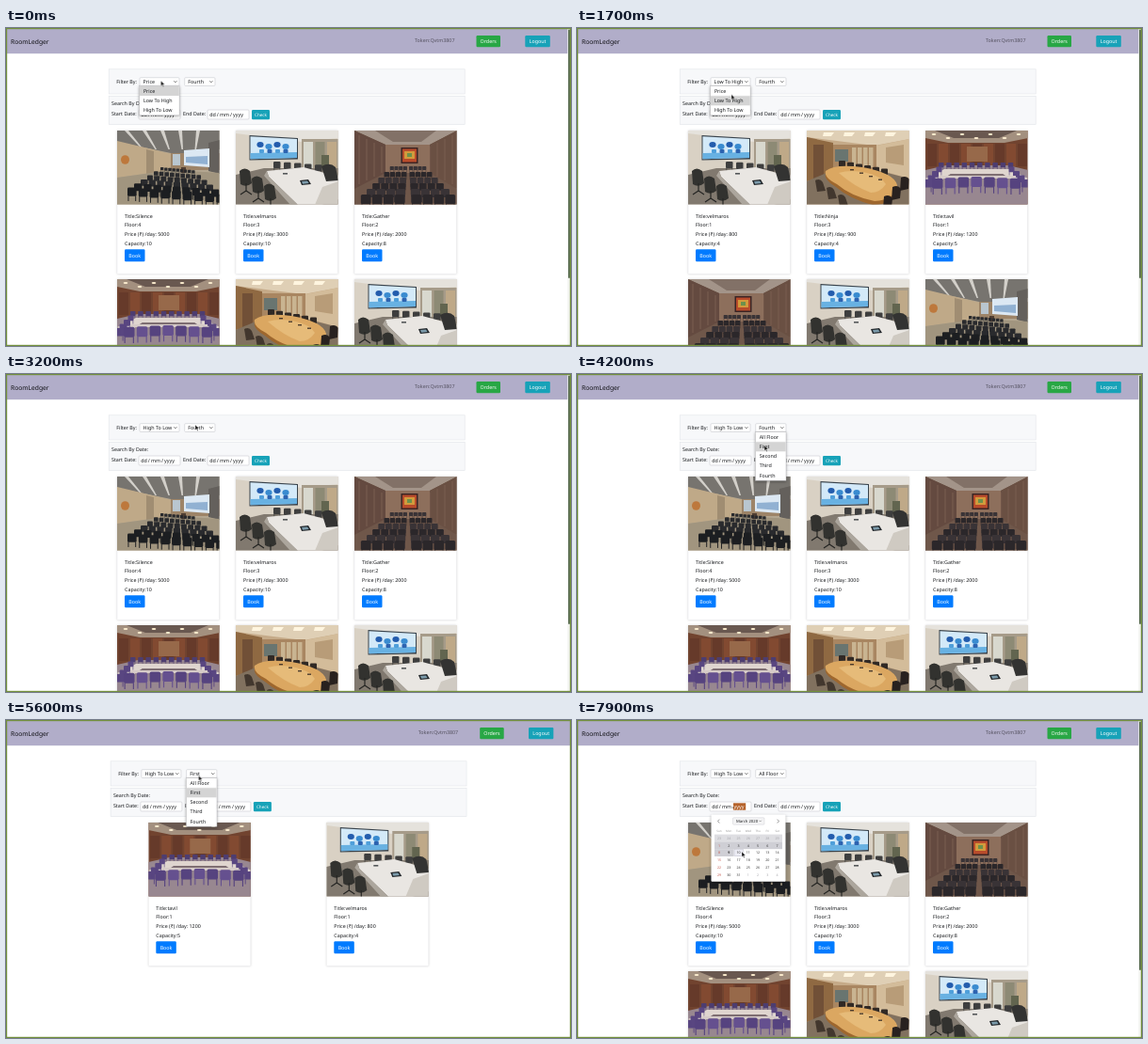
Recreate the animation shown at these times as an HTML page. Size 600 by 338 pixels, loop 8 s.

```html
<!DOCTYPE html>
<html lang="en">
<head>
<meta charset="utf-8">
<title>Room booking</title>
<style>
html, body { margin: 0; width: 100%; height: 100%; overflow: hidden; background: #fff; }
svg { display: block; }
#stage { width: 600px; height: 338px; overflow: hidden; }
text { font: 5.35px "Noto Sans", "Open Sans", sans-serif; fill: #17191c; text-rendering: geometricPrecision; }
.brand { font-size: 6.7px; font-weight: 500; fill: #101014; }
.token { fill: #54515f; }
.btn { fill: #fff; text-anchor: middle; }
.small { font-size: 4.6px; }
.date { word-spacing: -.3px; }
.day { font-size: 3.6px; text-anchor: middle; }
.week { font-size: 3px; text-anchor: middle; fill: #999; }
.card { filter: drop-shadow(0 .8px 1px #0002); }
.pop { filter: drop-shadow(0 1px 1.5px #0005); }

.step { animation: 8s step-end infinite; }
.high { animation-name: high; }
.low { animation-name: low; }
.first { animation-name: first; }
.price { animation-name: price; }
.sorted { animation-name: sorted; }
.fourth { animation-name: fourth; }
.all { animation-name: all; }
.full { animation-name: full; }
.priceMenu { animation-name: priceMenu; }
.floorMenu { animation-name: floorMenu; }
.calendar { animation-name: calendar; }
.today { animation-name: today; }
.priceHover { animation-name: priceHover; }
.floorHover { animation-name: floorHover; }
.mid { animation-name: mid; }
.right { animation-name: right; }
#cursor { animation: cursor 8s ease-in-out infinite; }

@keyframes high { 0%, 25%, 75% { visibility: visible } 7.5%, 55% { visibility: hidden } }
@keyframes low { 0%, 25% { visibility: hidden } 7.5% { visibility: visible } }
@keyframes first { 0%, 75% { visibility: hidden } 55% { visibility: visible } }
@keyframes price { 0% { visibility: visible } 7.5% { visibility: hidden } }
@keyframes sorted { 0% { visibility: hidden } 25% { visibility: visible } }
@keyframes fourth { 0% { visibility: visible } 55% { visibility: hidden } }
@keyframes all { 0% { visibility: hidden } 75% { visibility: visible } }
@keyframes full { 0%, 75% { visibility: visible } 55% { visibility: hidden } }
@keyframes priceMenu { 0%, 17.5% { visibility: visible } 7.5%, 25% { visibility: hidden } }
@keyframes floorMenu { 0%, 55%, 75% { visibility: hidden } 43.75%, 66.25% { visibility: visible } }
@keyframes calendar { 0% { visibility: hidden } 86.25% { visibility: visible } }
@keyframes today { 0% { visibility: hidden } 97.5% { visibility: visible } }
@keyframes priceHover { 0% { transform: none } 3.75% { transform: translateY(10.2px) } 22.5% { transform: translateY(20.4px) } }
@keyframes floorHover {
  0% { transform: translateY(40.8px) } 46.25%, 71.25% { transform: none } 48.75% { transform: translateY(10.2px) }
}
@keyframes mid { 0%, 75% { transform: none } 55% { transform: translateX(1.9px) } }
@keyframes right { 0%, 75% { transform: none } 55% { transform: translateX(3.7px) } }
@keyframes cursor {
  0% { transform: translate(164.5px, 56px) }
  5%, 7.5% { transform: translate(164px, 75px) }
  11.25% { transform: translate(164px, 73px) }
  15%, 17.5% { transform: translate(165px, 56px) }
  25%, 30% { transform: translate(163px, 85px) }
  37.5% { transform: translate(200px, 55px) }
  40%, 43.75% { transform: translate(201px, 54px) }
  50%, 55% { transform: translate(199px, 76px) }
  65%, 70% { transform: translate(204.5px, 59px) }
  72.5%, 76.25% { transform: translate(205px, 65px) }
  83.75%, 90% { transform: translate(167.5px, 93px) }
  98.75%, 100% { transform: translate(175px, 140px) }
}
</style>
</head>
<body>
<svg id="stage" viewBox="0 0 600 338"></svg>
<script>
const rect = (x, y, w, h, fill, extra = '') =>
  `<rect x="${x}" y="${y}" width="${w}" height="${h}" fill="${fill}" ${extra}/>`;
const path = (d, fill, extra = '') => `<path d="${d}" fill="${fill}" ${extra}/>`;
const oval = (x, y, rx, ry, fill) => `<ellipse cx="${x}" cy="${y}" rx="${rx}" ry="${ry}" fill="${fill}"/>`;
const text = (x, y, s, cls = '', extra = '') => `<text x="${x}" y="${y}" class="${cls}" ${extra}>${s}</text>`;
const group = (cls, body) => `<g class="${cls}">${body}</g>`;
const step = (name, body) => group('step ' + name, body);
const times = (n, fn) => Array.from({ length: n }, (_, i) => fn(i)).join('');
const line = (d, color, w) => path(d, 'none', `stroke="${color}" stroke-width="${w}"`);

const chair = (x, y, s, color) =>
  rect(x, y, s, s * .95, color, `rx="${s * .15}"`) +
  line(`M${x + s * .1} ${y + s * .9}v${s * .6}M${x + s * .9} ${y + s * .9}v${s * .6}`, color, s * .1);

// Meeting rooms, each 108.5 x 78.5
const rooms = {
  hall:
    rect(0, 0, 109, 79, '#b3a690') +
    path('M0 0H109V20L62 25 0 12z', '#77746f') +
    times(5, i => path(`M${8 + i * 19} 0h4l${16 - i * 5} 20h-1.5z`, '#d3d0ca')) +
    path('M0 11L58 25V42L0 50z', '#bfa988') +
    path('M31 20l8 2v24l-8 1z', '#a08d72') +
    oval(8.5, 31, 4.5, 4.8, '#bd783c') +
    rect(57, 24, 52, 18, '#9d8468') +
    path('M97 13L109 10V46L97 43z', '#64605c') +
    rect(59, 25, 8, 12, '#b9c6cf') +
    path('M71 21L98 19V39L71 37z', '#dce8f3') +
    path('M73 28L96 27V36L73 34z', '#91b1d2') +
    path('M0 50L58 42 109 45V79H0z', '#a1957f') +
    rect(68, 39, 5, 6, '#503f33') +
    times(6, r => times(9, i => {
      const s = 3.4 + r * 1.25;
      return chair(46 - r * 7 + i * s * 1.22, 39 + r * 4.3 + i * (.4 + r * .1), s, r > 3 ? '#1c1e21' : '#292a2d');
    })),
  office:
    rect(0, 0, 109, 79, '#d9d1c4') +
    path('M0 0H109V8L70 12 0 3z', '#e5e2dc') +
    rect(70, 9, 39, 38, '#a69b89') +
    times(3, i => rect(72 + i * 12.5, 12, 10, 30, ['#d8d8ce', '#8d8a75', '#bfa988'][i])) +
    rect(91, 26, 8, 15, '#62654f') +
    path('M0 47L30 40H109V79H0z', '#81796f') +
    path('M14.5 5L66 8V30.5L14.5 31.5z', '#38424b') +
    path('M15.5 6.2L65 9V29L15.5 30.3z', '#d3e9f8') +
    path('M15.5 24L65 23V29L15.5 30.3z', '#68b1e2') +
    times(4, i => oval(26 + i * 9, 15 + i % 2 * 2, 3.6, 3, i % 2 ? '#398bd0' : '#235cad') +
      rect(25 + i * 8.5, 20, 5, 4, i % 2 ? '#2c63b0' : '#4f9fda', 'rx="1"')) +
    times(5, i => chair(40 + i * 11, 33 + i * .8, 7.5, '#3e3e3e')) +
    path('M33 43L72 39 109 49V73L91 79H66L35 49z', '#e9e6e2') +
    path('M33 43L35 49 66 79H58L30 48z', '#aca69d') +
    path('M92 60L109 54V79H84z', '#cfcac2') +
    path('M68 53l9-1 3 5-10 1z', '#24292d') +
    path('M70 54l6-.6 1.6 2.6-6.5.7z', '#7c9bab') +
    rect(50, 45, 5, 1.6, '#55585a') +
    times(3, i => path(`M${4 + i * 13} ${43 + i * 8}q5-5 11 0l2 13q-6 5-12 1z`, '#32322f') +
      line(`M${11 + i * 13} ${56 + i * 8}v9m-6 3l6-4 6 4`, '#252523', 1.2)) +
    path('M91 38q9-5 15 1l3 14-13 1z', '#333332'),
  cinema:
    rect(0, 0, 109, 79, '#69503f') +
    path('M0 0H109L80 15H33z', '#a39489') +
    path('M22 0H87L71 12H41z', '#827167') +
    path('M0 0L33 15V46L0 62z', '#644a40') +
    path('M109 0L80 15V46L109 62z', '#6a5043') +
    times(4, i => line(`M${5 + i * 8} ${5 + i * 4}V${57 - i * 4}M${104 - i * 8} ${5 + i * 4}V${57 - i * 4}`, '#775c4e', 1.2)) +
    rect(33, 15, 47, 30, '#8d6f5c') +
    rect(49.5, 18, 18, 17, '#3a2525') +
    rect(51, 19.5, 15, 14, '#b84b2b') +
    rect(53, 22, 11, 8, '#d39a3c') +
    rect(56, 24, 5, 4, '#6c914c') +
    path('M33 45H80L109 62V79H0V62z', '#6f574a') +
    times(6, r => times(8, i => {
      const s = 4.2 + r * 1.3, side = i < 4 ? -1 : 1, n = i % 4;
      return chair(57 + side * (1 + r * .5 + n * s * 1.12) - (side < 0 ? s : 0), 38 + r * 6, s, r % 2 ? '#2b272a' : '#393336');
    })),
  lounge:
    rect(0, 0, 109, 79, '#71432f') +
    path('M0 0H109V8L84 13H24L0 8z', '#a3907f') +
    path('M10 0H97L78 8H30z', '#695850') +
    times(7, i => oval(9 + i * 15, 4 + (i % 2) * 4, 2.4, .9, '#fff0d2')) +
    times(9, i => rect(2 + i * 12, 14, 10, 24, i % 2 ? '#824a31' : '#663a2a')) +
    rect(44, 17, 22, 16, '#97694a') +
    path('M0 42L22 37H88L109 42V79H0z', '#988790') +
    times(10, i => chair(14 + i * 8.2, 34, 5.5, '#4d3d70')) +
    path('M20 41H89L109 51 98 56 82 46H27L12 56 0 51z', '#dfd5cf') +
    path('M27 46H82L87 50H21z', '#7e6e72') +
    times(4, i => chair(-2 + i * 4.5, 52 - i * 4.5, 9 - i, '#594681') + chair(102 - i * 4.5, 52 - i * 4.5, 9 - i, '#594681')) +
    rect(14, 48, 82, 3, '#d6cbc8') +
    times(7, i => chair(7 + i * 13.8, 49 + Math.abs(i - 3) * .6, 11.5, i % 2 ? '#65508f' : '#56437f')),
  oval:
    rect(0, 0, 109, 79, '#c5aa88') +
    path('M0 0H109V9L72 16 0 7z', '#dfcfb5') +
    times(4, i => path(`M${18 + i * 22} 2h11l-3 4h-9z`, '#fff5df')) +
    path('M0 7L28 13V46L0 54z', '#8f6942') +
    rect(7, 15, 11, 36, '#715037') +
    rect(28, 15, 46, 28, '#a98661') +
    rect(30, 20, 14, 13, '#697570') +
    times(4, i => rect(48 + i * 6, 18, 4.5, 21, '#c9b491')) +
    path('M74 16L109 9V51L74 41z', '#d3bc9a') +
    path('M84 18L103 15V37L84 34z', '#b89c78') +
    path('M0 54L28 42H74L109 51V79H0z', '#81715f') +
    times(6, i => chair(34 + i * 9, 32 + i * 1.7, 7, '#302925')) +
    path('M20 46Q28 38 58 41Q92 48 95 62Q93 79 70 79Q46 73 31 60Q18 52 20 46z', '#9e672e') +
    path('M20 43Q30 35 59 39Q93 45 96 58Q94 74 72 75Q47 70 32 57Q18 50 20 43z', '#dba761') +
    path('M34 45Q47 41 64 45Q80 49 84 57Q78 66 68 66Q51 60 34 45z', '#e6bb79') +
    times(4, i => rect(46 + i * 10, 41 + i * 3.5, 4, 1.4, '#4d3c2d')) +
    times(3, i => path(`M${100 - i * 9} ${50 + i * 10}q6-3 9 2l-1 10-9 2z`, '#28211f')) +
    times(3, i => path(`M${9 + i * 12} ${53 + i * 8}q5-3 8 2l3 9-9 1z`, '#42372e'))
};

const spaces = {
  silence: ['hall', 'Silence', 4, 5000, 10],
  big: ['office', 'velmaros', 3, 3000, 10],
  gather: ['cinema', 'Gather', 2, 2000, 8],
  tavil: ['lounge', 'tavil', 1, 1200, 5],
  ninja: ['oval', 'Ninja', 3, 900, 4],
  small: ['office', 'velmaros', 1, 800, 4]
};

const button = (x, y, w, h, label, color, cls = '') =>
  rect(x, y, w, h, color, 'rx="1.2"') + text(x + w / 2, y + h / 2 + 1.9, label, 'btn ' + cls);

function card(name, x, y) {
  const [room, title, floor, price, seats] = spaces[name];
  const rows = ['Title:' + title, 'Floor:' + floor, `Price (₹) /day: ${price}`, 'Capacity:' + seats];
  return group('card', rect(x, y, 108.5, 152.5, '#fff', 'stroke="#e6e6e8" stroke-width=".5" rx="1"')) +
    `<use href="#${room}" x="${x}" y="${y}" width="108.5" height="78.5"/>` +
    rows.map((row, i) => text(x + 8, y + 92.7 + i * 9.65, row)).join('') +
    button(x + 8, y + 126.2, 21.5, 13, 'Book', '#007bff');
}
const grid = names => names.split(' ').map((n, i) =>
  card(n, 118 + i % 3 * 126, 109 + Math.floor(i / 3) * 158)).join('');

const field = (x, y, w, h) => rect(x, y, w, h, '#fff', 'stroke="#c9cbd0" stroke-width=".6" rx="1"');
const select = (x, w, options) => field(x, 52.7, w, 8.8) +
  options.map(([cls, label]) => step(cls, text(x + 3.6, 59, label))).join('') +
  line(`M${x + w - 5.6} 56.3l1.5 1.5 1.5-1.5`, '#333', .7);
const menu = (cls, x, w, items) => step(cls, group('pop',
  rect(x, 61.6, w, items.length * 10.2 + .6, '#fff', 'stroke="#b9b9bc" stroke-width=".5"')) +
  step(cls.replace('Menu', 'Hover'), rect(x + .3, 61.9, w - .6, 10.2, '#d4d4d4')) +
  items.map((s, i) => text(x + 4.2, 68.8 + i * 10.2, s)).join(''));

function calendar() {
  const col = i => 151 + i * 10.27;
  const day = i => {
    const c = i % 7, r = Math.floor(i / 7), n = i < 7 ? 23 + i : i > 37 ? i - 37 : i - 6;
    const fill = i < 7 || i > 37 ? '#a5a5aa' : c ? '#333' : '#c4564a';
    return text(col(c), 126.8 + r * 7.8, n, 'day', `style="fill:${fill}${i === 15 ? ';font-weight:700' : ''}"`);
  };
  return group('pop', rect(142.5, 100.5, 79, 71.3, '#fff', 'rx="1"')) +
    line('M151.3 105.7l-1.7 1.9 1.7 1.9M212.7 105.7l1.7 1.9-1.7 1.9', '#555', .6) +
    rect(165.5, 103.8, 33.5, 7.4, '#f4f4f5', 'stroke="#c6c6ca" stroke-width=".4" rx="1"') +
    text(180.5, 109, 'March 2020', 'day', 'style="font-size:4.2px"') +
    line('M193.4 106.8l1.2 1.2 1.2-1.2', '#555', .5) +
    'Sun Mon Tue Wed Thu Fri Sat'.split(' ').map((s, i) => text(col(i), 119, s, 'week')).join('') +
    rect(146, 121.6, 72, 7.8, '#dedee2') + rect(146, 129.4, 72, 7.8, '#cfcfd5') + rect(146, 137.2, 20.5, 7.8, '#cfcfd5') +
    step('today', rect(167, 137.4, 9.4, 7.4, '#ececf4', 'stroke="#b5b5c2" stroke-width=".4"')) +
    times(42, day);
}

const date = x => field(x, 87, 44, 10) + text(x + 2.2, 94.1, 'dd / mm / yyyy', 'date');
const panel = (y, h) => rect(109.2, y, 378, h, '#f7f8fa', 'stroke="#e2e4e8" stroke-width=".6"');

const header =
  rect(0, 1, 600, 26.2, '#b1adc9') +
  text(5, 16.6, 'RoomLedger', 'brand') +
  step('right', text(434, 15, 'Token:Qvtm3807', 'token') +
    button(499.5, 8, 25.5, 12.2, 'Orders', '#28a745') +
    button(551.3, 8, 26.5, 12.2, 'Logout', '#17a2b8')) +
  step('full', rect(596.3, 1, 3.7, 337, '#f3f4f1') + rect(597, 1.5, 2, 264.5, '#5f7158', 'rx="1"'));

const filters =
  panel(43.8, 26.2) + panel(72.4, 30.2) +
  text(117.3, 58.7, 'Filter By:') +
  select(142, 42, [['price', 'Price'], ['low', 'Low To High'], ['sorted', 'High To Low']]) +
  select(189.7, 32.3, [['fourth', 'Fourth'], ['first', 'First'], ['all', 'All Floor']]) +
  text(112, 81.9, 'Search By Date:') + text(112, 93.1, 'Start Date:') + text(188, 93.1, 'End Date:') +
  date(141) + date(214) +
  button(261, 87, 19, 10.2, 'Check', '#17a2b8', 'small') +
  step('calendar', rect(166, 88.3, 13.2, 7.4, '#b5622a') + text(166.5, 94.1, 'yyyy', '', 'style="fill:#fff"'));

const popups =
  menu('priceMenu', 141.7, 42.4, ['Price', 'Low To High', 'High To Low']) +
  menu('floorMenu', 189.5, 32.5, ['All Floor', 'First', 'Second', 'Third', 'Fourth']) +
  step('calendar', calendar());

document.getElementById('stage').innerHTML =
  '<defs>' + Object.entries(rooms).map(([id, art]) =>
    `<symbol id="${id}" viewBox="0 0 108.5 78.5">${art}</symbol>`).join('') + '</defs>' +
  rect(0, 0, 600, 338, '#fff') +
  step('high', grid('silence big gather tavil ninja small')) +
  step('low', grid('small ninja tavil gather big silence')) +
  step('first', card('tavil', 151.3, 109) + card('small', 340.3, 109)) +
  header + step('mid', filters) + step('mid', popups) +
  rect(.6, .6, 598.8, 336.8, 'none', 'stroke="#728f3c" stroke-width="1.2"') +
  `<g id="cursor">${path('M0 0V5.4L1.3 4.3 2.2 6.4 3.1 6 2.2 4H3.9z', '#111', 'stroke="#fff" stroke-width=".35"')}</g>`;
</script>
</body>
</html>
```
